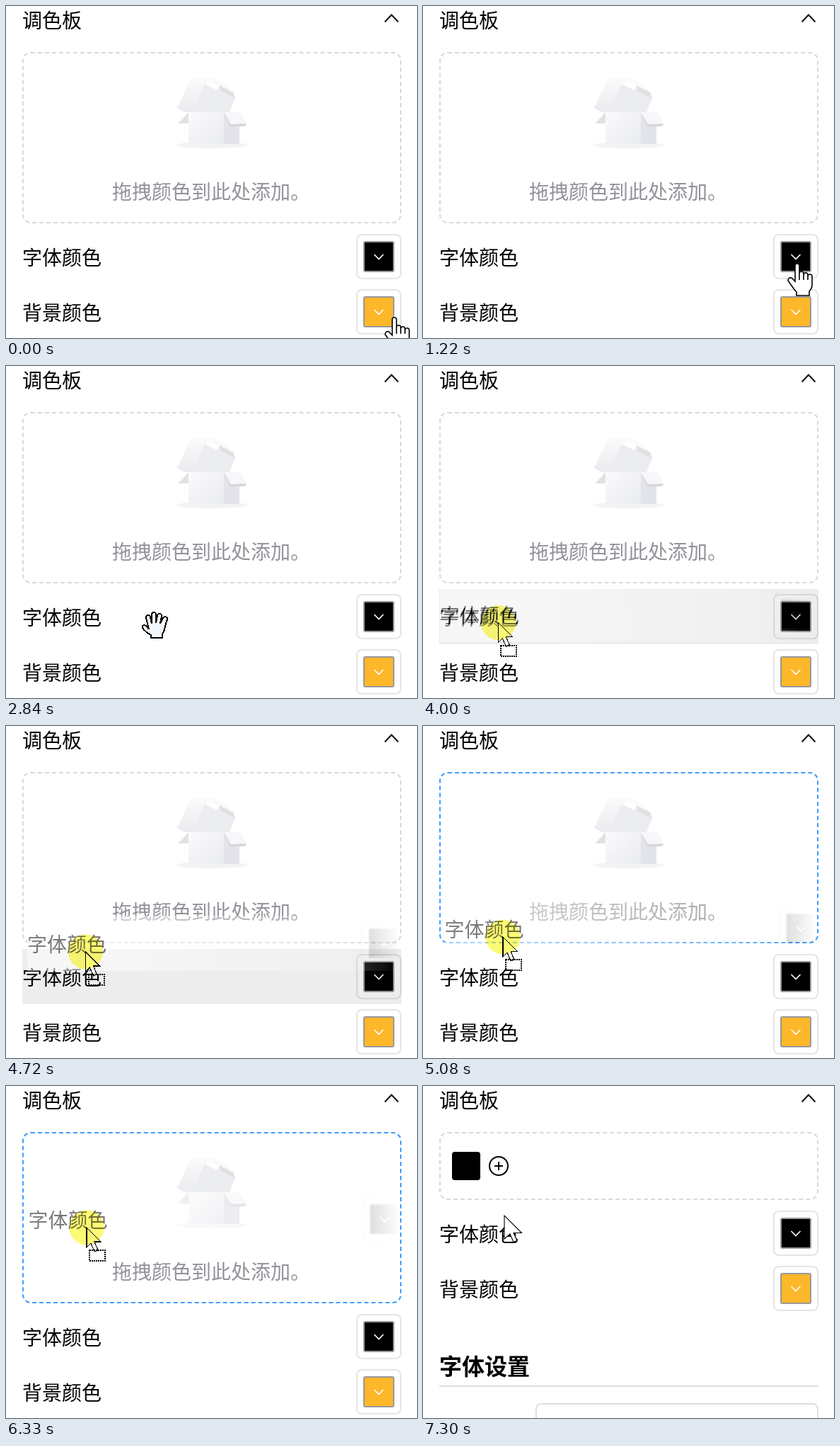
These frames come from a looping animation (581 by 469 pixels, 8 s). An HTML page:

```html
<!DOCTYPE html>
<html lang="zh-CN">
<head>
<meta charset="utf-8">
<title>调色板</title>
<style>
html, body { margin: 0; width: 100%; height: 100%; overflow: hidden; background: #fff; }
#zone {
  position: absolute; left: 23px; top: 65px; width: 536px; height: 242px;
  box-sizing: border-box; border: 2px dashed #d9d9d9; border-radius: 12px;
}
#zone.over { border-color: #409eff; }
#zone.filled { height: 96px; }
svg { position: absolute; left: 0; top: 0; }
text { font: 28px "Noto Sans CJK SC", "Noto Sans CJK", sans-serif; }
.title { font-size: 32px; font-weight: 700; }
.line { fill: none; stroke-width: 2; }
.cursor { fill: #fff; stroke: #000; stroke-width: 1.6; }
.thin { stroke-width: 1.1; }
#press { fill: #fcfa74; }
#press, #shade { mix-blend-mode: multiply; }
</style>
</head>
<body>
<div id="zone"></div>
<svg width="581" height="469" viewBox="0 0 581 469">
  <defs>
    <linearGradient id="front" x2="1" y2="1">
      <stop stop-color="#fbfbfd"/><stop offset="1" stop-color="#e8eaef"/>
    </linearGradient>
    <linearGradient id="lid" x1=".6" y1="0" x2=".2" y2="1">
      <stop stop-color="#fcfcfd"/><stop offset="1" stop-color="#ebecef"/>
    </linearGradient>
    <radialGradient id="fade" gradientUnits="userSpaceOnUse" cx="105" cy="366" r="445">
      <stop stop-color="#fff" stop-opacity=".58"/>
      <stop offset=".15" stop-color="#fff" stop-opacity=".5"/>
      <stop offset=".9" stop-color="#fff" stop-opacity=".13"/>
      <stop offset="1" stop-color="#fff" stop-opacity="0"/>
    </radialGradient>
    <mask id="veil" maskUnits="userSpaceOnUse" x="0" y="300" width="581" height="110">
      <rect y="300" width="581" height="110" fill="url(#fade)"/>
    </mask>
    <g id="swatch">
      <rect x="496" y="323" width="62" height="62" rx="7" fill="#fff" stroke="#e4e4e9" stroke-width="2"/>
      <rect x="506" y="333" width="42" height="42" rx="2" stroke="#999" stroke-width="2"/>
      <path class="line" d="M520.5 351L527 357.5L533.5 351" stroke="#fff" style="stroke-width:1.6"/>
    </g>
    <g id="fontRow">
      <text x="23" y="366">字体颜色</text>
      <use href="#swatch"/>
    </g>
  </defs>

  <text x="23" y="31">调色板</text>
  <path class="line" d="M535.5 22.5L545 12.500L554.5 22.5" stroke="#111"/>

  <g id="empty">
    <ellipse cx="291" cy="196.5" rx="50" ry="5" fill="#f4f4f7"/>
    <path d="M262 101L300 102L324 124L315 150H253L242 144Z" fill="url(#lid)"/>
    <path d="M281 110L298 119L303 112L324 130L316 150H263Z" fill="#ecedf1"/>
    <path d="M281 110L299 119L302 112L288 107Z" fill="#fff"/>
    <path d="M301 112L321 122L324 131L304 120Z" fill="#e0e0e3"/>
    <path d="M258 150L243 166H258Z" fill="#e3e3e5"/>
    <path d="M258 150H308V195H258Z" fill="url(#front)"/>
    <path d="M308 150H330V195H308Z" fill="#e3e4ea"/>
    <path d="M308 150L317 171L338 170L340 166Z" fill="#d9d9dc"/>
    <path d="M308 150H331L340 166L318 167Z" fill="#f7f7f9"/>
    <text x="150" y="273" fill="#909399">拖拽颜色到此处添加。</text>
  </g>

  <g id="added">
    <rect x="41" y="93" width="40" height="40" rx="4"/>
    <circle class="line" cx="107" cy="113" r="13" stroke="#000"/>
    <path class="line" d="M101 113H113M107 107V119" stroke="#000"/>
  </g>

  <g id="rows">
    <use href="#fontRow"/>
    <text x="23" y="444">背景颜色</text>
    <use href="#swatch" y="78" fill="#fdb72b"/>
    <text class="title" x="23" y="554">字体设置</text>
    <path class="line" d="M23 570H559" stroke="#dcdfe6"/>
    <rect class="line" x="160" y="595" width="398" height="60" rx="7" stroke="#dcdfe6"/>
  </g>
  <rect id="shade" x="23" y="315" width="536" height="78" fill="#ededed"/>

  <g id="ghost">
    <g mask="url(#veil)">
      <rect x="23" y="315" width="536" height="78" fill="#fff"/>
      <use href="#fontRow"/>
    </g>
  </g>

  <g id="cursor">
    <g id="point" class="cursor">
      <path d="M-3 3Q-3 0 0 0T3 3V14Q3 11 6 11T9 14V16Q9 13 12 13T15 16V18Q15 15 18 15T21 18V30Q21 35 17 39V45H-1V40Q-5 36 -8 31L-13 24Q-13 19 -8 20L-3 25Z"/>
      <path d="M3 14V23M9 16V23M15 18V23"/>
    </g>
    <path id="grab" class="cursor" shape-rendering="crispEdges" style="fill:#f0f7fd;stroke-width:2"
      d="M-17 4Q-18 0 -14 0Q-11 1 -8 6L-12 -10Q-12 -14 -9 -14T-6 -11L-4 -2V-14Q-4 -18 -1 -18T2 -15V-3L4 -14Q5 -17 8 -16T10 -12L8 -2L12 -10Q14 -13 17 -11T17 -6L14 6Q13 10 11 13V18H-5V14Q-13 10 -17 4Z"/>
    <g id="drag" class="cursor thin" shape-rendering="crispEdges">
      <path d="M0 0V28L6 22L11 34L16 32L11 20H20Z"/>
      <rect x="4" y="32" width="22" height="15" fill="none" stroke-dasharray="2 1" stroke-width="2"/>
    </g>
    <path id="arrow" class="cursor thin" d="M0 0V33L8 26L13 37.5L18 35.5L13 24.5H24.5Z"/>
  </g>
  <circle id="press"/>
</svg>
<script>
const LOOP = 8000;
const $ = id => document.getElementById(id);

// [time, x, y] of the cursor hot spot
const path = [
  [0, 549, 440], [740, 533, 375], [1220, 529, 364], [1340, 528, 359], [1720, 528, 359],
  [2480, 283, 360], [2840, 210, 366], [3320, 126, 366], [3540, 105, 366], [3800, 105, 366],
  [4220, 110, 354], [4720, 112.5, 319], [4960, 113, 305], [5540, 113, 271.5], [5800, 113.5, 243],
  [6330, 114, 200], [6690, 115, 184], [7030, 115, 183], [LOOP, 115, 183]
];

// The screen refreshes in alternating steps of 20 and 100 ms.
function snap(t) {
  const base = t < 1740 ? 0 : t < 4220 ? 1740 : t < 6100 ? 4220 : 4270;
  const r = (t - base) % 120;
  return t - r + (r < 20 ? 0 : 20);
}

function position(t) {
  const i = Math.max(1, path.findIndex(p => p[0] > t));
  const [t0, x0, y0] = path[i - 1], [t1, x1, y1] = path[i];
  const k = (t - t0) / (t1 - t0);
  return [x0 + (x1 - x0) * k, y0 + (y1 - y0) * k];
}

const show = (id, on) => $(id).style.display = on ? "" : "none";
const move = (id, x, y) => $(id).setAttribute("transform", `translate(${x} ${y})`);

function draw(now) {
  const t = now % LOOP;
  const [x, y] = position(snap(t));
  const dragging = t >= 3900 && t < 6790;
  const dropped = t >= 7030;
  const kind = dragging ? "drag" : t >= 6790 ? "arrow" : x < 495 ? "grab" : "point";

  for (const id of ["point", "grab", "drag", "arrow"]) show(id, id === kind);
  move("cursor", x, y);
  move("ghost", x - 105.5, y - 366);
  move("rows", 0, dropped ? -146 : 0);
  show("ghost", dragging);
  show("shade", dragging && t < 4940);
  show("empty", !dropped);
  show("added", dropped);
  show("press", t >= 3540 && t < 7290);
  $("press").setAttribute("cx", x);
  $("press").setAttribute("cy", y);
  $("press").setAttribute("r", t < 6790 ? 24.5 : 20);
  $("zone").className = dropped ? "filled" : t >= 5060 ? "over" : "";
}

const start = performance.now();
function tick() {
  draw(performance.now() - start);
  requestAnimationFrame(tick);
}
tick();
</script>
</body>
</html>
```
